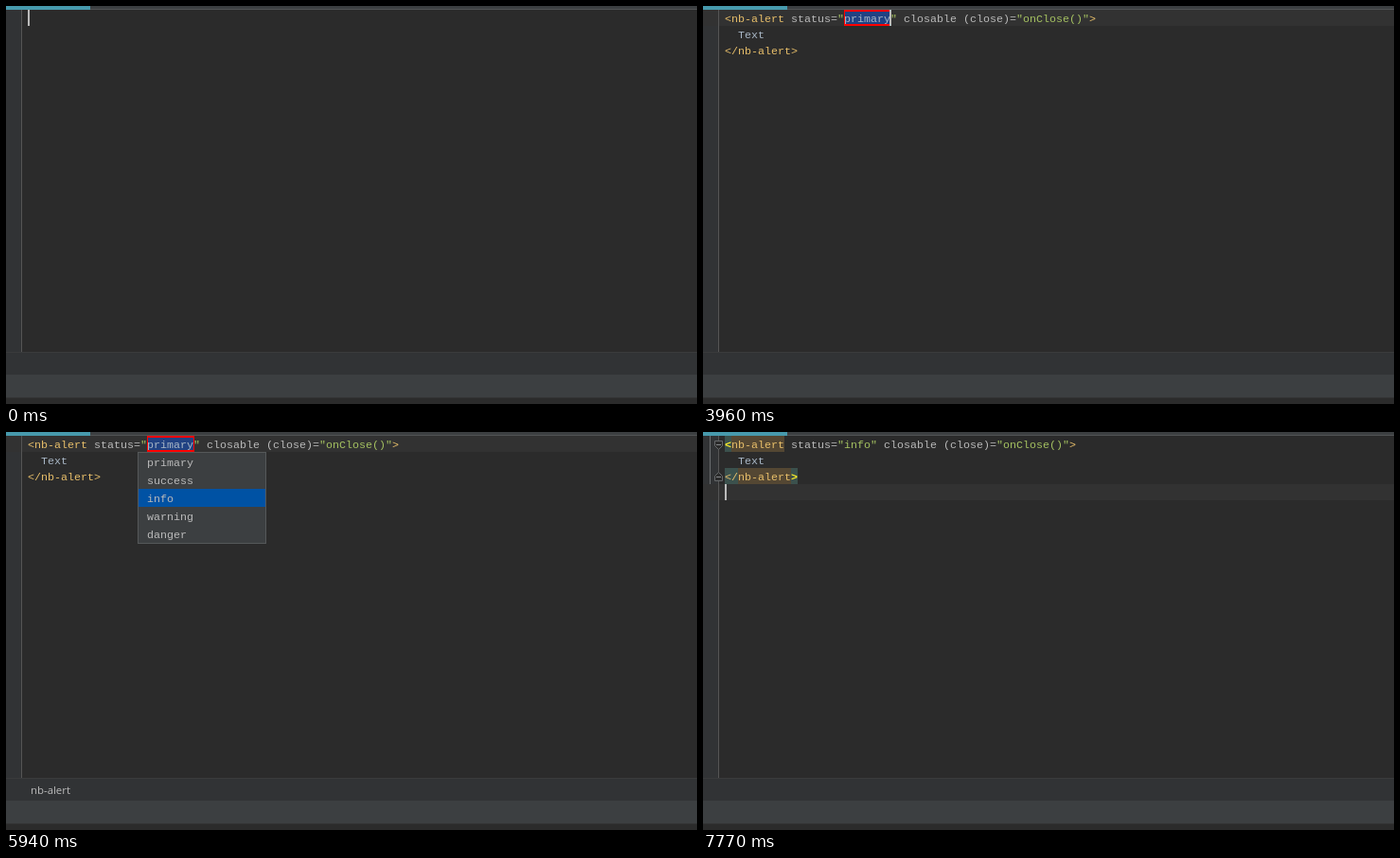
Write an HTML page with a canvas that moves like this. It is 730 px wide and 420 px high and loops after 8 s.

```html
<!DOCTYPE html>
<html lang="en">
<head>
<meta charset="utf-8">
<title>Editor snippet completion</title>
<style>
html, body { margin: 0; width: 730px; height: 420px; overflow: hidden; background: #2b2b2b; }
canvas { display: block; }
</style>
</head>
<body>
<canvas id="stage" width="730" height="420"></canvas>
<script>
const ctx = document.getElementById('stage').getContext('2d');
const LOOP = 8000, LEFT = 23, TOP = 4, CHAR = 7, LINE = 17;
const MONO = '11.667px "Liberation Mono", monospace';
const UI = '"Open Sans", sans-serif';
const TAG = '#e8bf6a', ATTR = '#bababa', STRING = '#a5c261', PLAIN = '#a9b7c6';
const BLUE = '#0052a4', SELECTION = '#214283', BRACE = '#3b514d', BRACE_TEXT = '#ffef28';
const OPTIONS = ['primary', 'success', 'info', 'warning', 'danger'];

// Each entry changes part of the editor state at its time; caret is [row, column].
const STEPS = [
  [0, { typed: '', row: -1, caret: [0, 0], blink: true }],
  [230, { blink: false }],
  [440, { typed: 'n', row: 0, caret: [0, 1], blink: true }],
  [780, { typed: 'nb', caret: [0, 2] }],
  [1590, { typed: 'nb-', caret: [0, 3] }],
  [2150, { typed: 'nb-a', caret: [0, 4] }],
  [2300, { typed: 'nb-al', caret: [0, 5] }],
  [2540, { typed: 'nb-ale', caret: [0, 6] }],
  [2660, { typed: 'nb-aler', caret: [0, 7] }],
  [2830, { squiggle: true }],
  [3200, { lookup: true }],
  [3740, { blink: false }],
  [3960, { status: 'primary', editing: true, squiggle: false, lookup: false, caret: [0, 25], blink: true }],
  [4020, { choice: 0 }],
  [4210, { crumb: true }],
  [4990, { blink: false }],
  [5280, { choice: 1 }],
  [5430, { choice: 2 }],
  [5500, { blink: true }],
  [5940, { blink: false }],
  [6170, { status: 'info', editing: false, choice: -1, textSelected: true, row: 1, caret: [1, 6], blink: true }],
  [6410, { textSelected: false, tags: true, folds: true, row: 2, caret: [2, 6] }],
  [6930, { braces: true, caret: [2, 11] }],
  [7170, { crumb: false }],
  [7240, { foldLine: true }],
  [7770, { row: 3, caret: [3, 0] }]
];

function stateAt(time) {
  const state = { choice: -1 };
  for (const [start, change] of STEPS) if (start <= time) Object.assign(state, change);
  return state;
}

function rect(x, y, w, h, color) {
  ctx.fillStyle = color;
  ctx.fillRect(x, y, w, h);
}

function text(str, x, y, color, font = MONO) {
  ctx.font = font;
  ctx.fillStyle = color;
  ctx.fillText(str, x, y);
}

const colX = col => LEFT + col * CHAR;
const rowY = row => TOP + row * LINE;

function mark(row, col, length, color) {
  rect(colX(col), rowY(row), length * CHAR, LINE, color);
}

function tokens(row, col, list) {
  for (const [str, color, bold] of list) {
    text(str, colX(col), rowY(row) + 13, color, (bold ? 'bold ' : '') + MONO);
    col += str.length;
  }
}

function drawFrame(s) {
  rect(0, 0, 730, 420, '#2b2b2b');
  rect(0, TOP, 16, 361, '#313335');
  if (s.row >= 0) rect(0, rowY(s.row), 730, LINE, '#323232');
  rect(16, TOP, 1, 361, '#555555');
  rect(0, 0, 730, 3, '#3c3f41');
  rect(0, 3, 730, 1, '#515455');
  rect(0, 0, 89, 4, '#479aad');
  rect(0, 365, 730, 1, '#3a3b3c');
  rect(0, 366, 730, 23, '#313335');
  rect(0, 389, 730, 24, '#3c3f41');
  rect(0, 413, 730, 1, '#323232');
  if (s.crumb) text('nb-alert', 26, 382, '#bbbbbb', '11.4px ' + UI);
}

function drawMarkup(s) {
  if (s.tags) {
    mark(0, 1, 8, '#544733');
    mark(2, 2, 8, '#544733');
  }
  if (s.braces) {
    mark(0, 0, 1, BRACE);
    mark(2, 0, 2, BRACE);
    mark(2, 10, 1, BRACE);
  }
  if (s.textSelected) mark(1, 2, 4, SELECTION);
  if (s.editing) mark(0, 18, 7, SELECTION);

  const brace = s.braces ? BRACE_TEXT : TAG;
  tokens(0, 0, [
    ['<', brace, s.braces], ['nb-alert', TAG], [' status=', ATTR], ['"', STRING],
    [s.status, s.editing ? PLAIN : STRING], ['"', STRING],
    [' closable (close)=', ATTR], ['"onClose()"', STRING], ['>', TAG]
  ]);
  tokens(1, 2, [['Text', PLAIN]]);
  tokens(2, 0, [['</nb-alert', TAG], ['>', brace, s.braces]]);

  if (s.editing) {
    rect(149, 4, 50, 2, '#ff0000');
    rect(149, 19, 50, 2, '#ff0000');
    rect(149, 4, 1, LINE, '#ff0000');
    rect(198, 4, 1, LINE, '#ff0000');
  }
}

function drawSquiggle() {
  ctx.beginPath();
  for (let x = 44; x <= 71; x += 2) ctx.lineTo(x, x % 4 ? 18.5 : 20.5);
  ctx.strokeStyle = '#659c6b';
  ctx.lineWidth = 1;
  ctx.stroke();
}

// Pentagon marker; dir is 1 when its point faces down, -1 when up.
function drawFold(y, dir) {
  ctx.beginPath();
  for (const [x, dy] of [[12.5, -4], [20.5, -4], [20.5, 1], [16.5, 5], [12.5, 1]]) {
    ctx.lineTo(x, y + dy * dir);
  }
  ctx.closePath();
  ctx.fillStyle = '#2b2b2b';
  ctx.fill();
  ctx.strokeStyle = '#66696b';
  ctx.lineWidth = 1;
  ctx.stroke();
  rect(14, Math.floor(y), 5, 1, '#85888a');
}

function panel(x, w, h) {
  rect(x, 21, w, h, '#555859');
  rect(x + 1, 22, w - 2, h - 2, '#3c3f41');
}

function drawLookup() {
  panel(13, 437, 36);
  rect(14, 22, 435, 19, BLUE);
  text('nb-aler', 23, 36, '#d78ade');
  text('t', 72, 36, '#bbbbbb');
  text('NbAlertComponent basic with status and closeable', 106, 36, '#bbbbbb');
  text('Dot, space and some other keys will also close this lookup and be inserted into editor',
    15, 52, '#bbbbbb', '9.42px ' + UI);
}

function drawOptions(choice) {
  panel(139, 136, 97);
  rect(140, 22 + choice * 19, 134, 19, BLUE);
  OPTIONS.forEach((name, i) => text(name, 149, 36 + i * 19, '#bbbbbb'));
}

function draw(time) {
  const s = stateAt(time);
  drawFrame(s);
  if (s.status) drawMarkup(s);
  else tokens(0, 0, [[s.typed, PLAIN]]);
  if (s.squiggle) drawSquiggle();
  if (s.foldLine) rect(7, TOP, 1, 51, '#6b6e70');
  if (s.folds) {
    drawFold(13.5, 1);
    drawFold(47.5, -1);
  }
  if (s.blink) {
    const [row, col] = s.caret;
    rect(Math.max(LEFT, colX(col) - 1), rowY(row), 2, LINE, '#bbbbbb');
  }
  if (s.lookup) drawLookup();
  if (s.choice >= 0) drawOptions(s.choice);
}

const began = performance.now();
function tick() {
  draw((performance.now() - began) % LOOP);
  requestAnimationFrame(tick);
}
tick();
</script>
</body>
</html>
```
